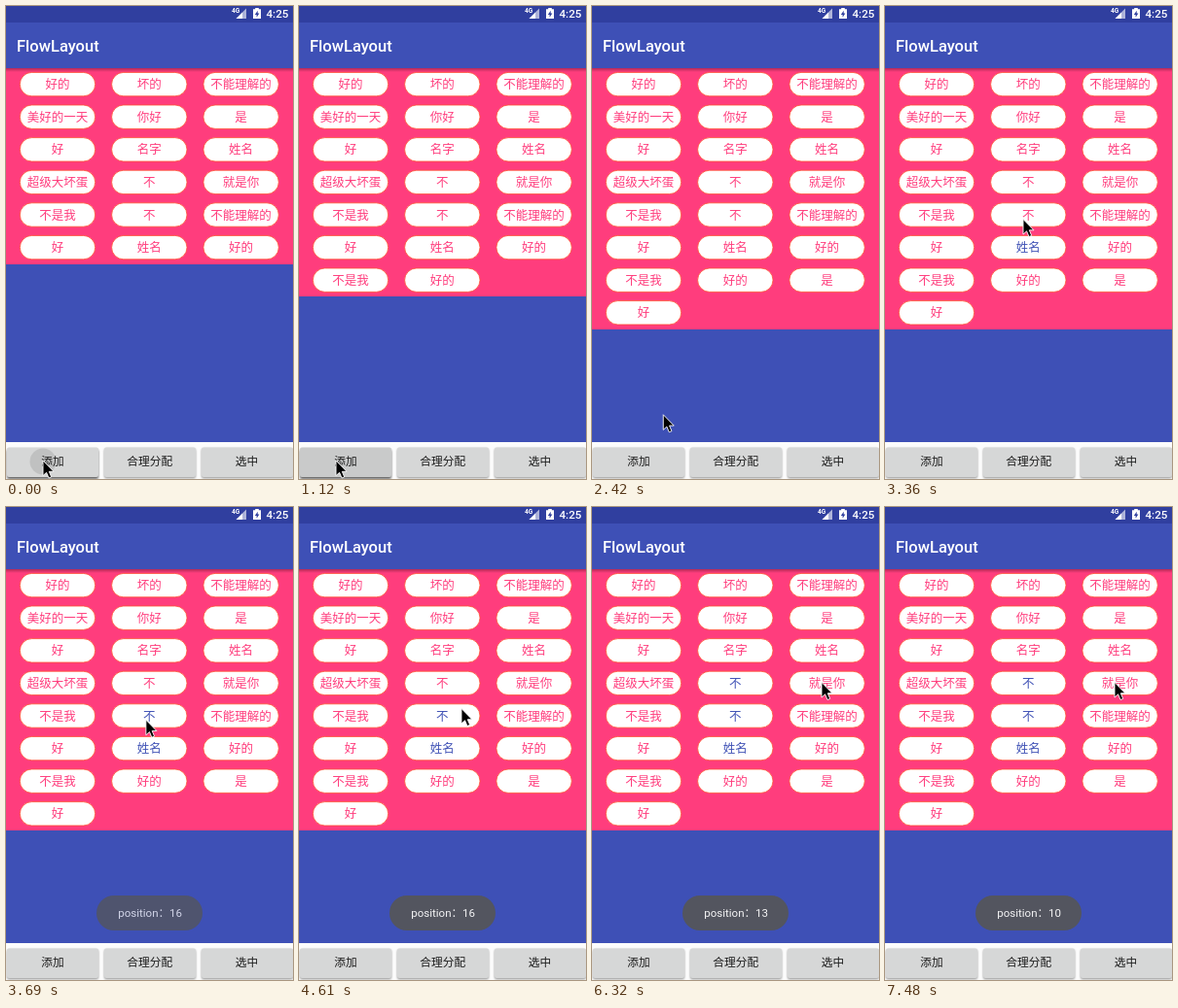
Recreate the animation shown at these times as an HTML page. Size 295 px wide and 487 px high, loop 8000 ms.

```html
<!DOCTYPE html>
<html lang="zh-CN">
<head>
<meta charset="utf-8">
<title>FlowLayout</title>
<style>
html, body { margin: 0; width: 100%; height: 100%; overflow: hidden; background: #3e50b6; }
svg { display: block; width: 295px; height: 487px; }
text { font-family: Roboto, 'Noto Sans CJK SC', 'Noto Sans CJK', sans-serif; }
.mid { text-anchor: middle; }
.tag { font-size: 12.5px; }
.label { font-size: 11.7px; font-weight: 500; fill: #1c1c1c; }
.toast { font-size: 11.5px; fill: #f4f4f5; }
</style>
</head>
<body>
<svg id="stage" viewBox="0 0 295 487" xmlns="http://www.w3.org/2000/svg">
  <defs>
    <linearGradient id="fade" x2="0" y2="1">
      <stop offset="0" stop-color="#000" stop-opacity=".3"/>
      <stop offset="1" stop-color="#000" stop-opacity="0"/>
    </linearGradient>
    <filter id="soft" x="-10%" y="-30%" width="120%" height="160%"><feGaussianBlur stdDeviation="1"/></filter>
    <clipPath id="key"><rect x="1" y="454.5" width="94" height="30.5" rx="2"/></clipPath>
  </defs>
  <rect width="295" height="487" fill="#3e50b6"/>
  <rect id="flow" y="64" width="295" fill="#ff3d7d"/>
  <rect y="64" width="295" height="4" fill="url(#fade)"/>
  <rect width="295" height="17" fill="#303f9f"/>
  <text x="11" y="47" font-size="16.5" font-weight="500" fill="#fff">FlowLayout</text>
  <g fill="#fff">
    <text x="232" y="6.5" font-size="6.5" font-weight="700">4G</text>
    <path d="M247 2.5V13H236.5Z" opacity=".35"/>
    <path d="M243 6.5V13H236.5Z"/>
    <path d="M247 2.5V13H243V6.5Z" opacity=".4"/>
    <path d="M254 3.2H256.2V2H259.8V3.2H262V13H254Z"/>
    <path d="M258.7 4.8L255.8 9H257.6V11.8L260.4 7.6H258.7Z" fill="#303f9f"/>
    <text x="267.5" y="12" font-size="11.6" font-weight="500">4:25</text>
  </g>
  <g id="tags"></g>
  <rect y="449" width="295" height="38" fill="#fcfcfc"/>
  <g id="keys"></g>
  <g id="toast">
    <rect x="93" y="400" width="109" height="36" rx="18" fill="#53555f"/>
    <text class="toast" x="174.5" y="422.3" text-anchor="end">position：1</text>
    <g id="digits"></g>
  </g>
  <path id="arrow" d="M0 0V15.6L3.6 12.3L6 18L8.7 16.9L6.3 11.3H11Z" fill="#000" stroke="#fff" stroke-width=".9"/>
</svg>
<script>
const LOOP = 8000;
const $ = id => document.getElementById(id);

function add(parent, name, attrs, text) {
  const el = document.createElementNS('http://www.w3.org/2000/svg', name);
  for (const k in attrs) el.setAttribute(k, attrs[k]);
  if (text) el.textContent = text;
  parent.appendChild(el);
  return el;
}

const words = ('好的 坏的 不能理解的 美好的一天 你好 是 好 名字 姓名 超级大坏蛋 不 就是你 ' +
  '不是我 不 不能理解的 好 姓名 好的 不是我 好的 是 好').split(' ');
const addedAt = { 18: 120, 19: 1120, 20: 1530, 21: 1950 };
const pickedAt = { 16: 3130, 13: 3640, 10: 5430 };

const tags = words.map((word, i) => {
  const x = 53 + (i % 3) * 94.3, y = 80.6 + Math.floor(i / 3) * 33.6;
  const group = add($('tags'), 'g', {});
  add(group, 'rect', { x: x - 38.7, y: y - 12.2, width: 77.4, height: 24.4, rx: 12.2,
    fill: '#fff', stroke: '#ff5030', 'stroke-width': .8 });
  const label = add(group, 'text', { class: 'tag mid', x, y: y + 4.6 }, word);
  return { group, label, shown: addedAt[i] || 0, picked: pickedAt[i] || Infinity };
});

let lift, ripple;
['添加', '合理分配', '选中'].forEach((word, i) => {
  const box = { x: 1 + i * 100, y: 454.5, width: 94, height: 30.5, rx: 2 };
  const shade = add($('keys'), 'rect', { ...box, y: 455.7, filter: 'url(#soft)', opacity: .4 });
  add($('keys'), 'rect', { ...box, fill: '#d6d7d7' });
  if (!i) {
    lift = shade;
    const clip = add($('keys'), 'g', { 'clip-path': 'url(#key)' });
    ripple = add(clip, 'circle', { cx: 38, cy: 469, fill: '#000' });
  }
  add($('keys'), 'text', { class: 'label mid', x: 48 + i * 99.7, y: 473.4 }, word);
});

const digits = ['6', '3', '0'].map(d => add($('digits'), 'text', { class: 'toast', x: 174.5, y: 422.3 }, d));

// time, x, y
const path = [
  [0, 38, 468], [2330, 38, 468], [2420, 73, 421.5], [2560, 108, 318], [2770, 131, 253],
  [3190, 131, 253], [3360, 142, 219.5], [3660, 142, 219.5], [3810, 151, 218],
  [3950, 151, 218], [4100, 167, 217], [4570, 167, 217], [4610, 167, 207.5],
  [4900, 157, 195], [5300, 142.5, 181], [5760, 142.5, 181], [5800, 146.5, 181],
  [6040, 190, 190], [6320, 236, 180.5], [LOOP, 236, 180.5]
];

const ramp = (t, a, b) => Math.min(1, Math.max(0, (t - a) / (b - a)));
const mix = (a, b, k) => a + (b - a) * k;

function cursorAt(t) {
  const i = path.findIndex((p, n) => n && t <= p[0]);
  const a = path[i - 1], b = path[i], k = ramp(t, a[0], b[0]);
  return [mix(a[1], b[1], k), mix(a[2], b[2], k)];
}

function draw(t) {
  for (const { group, label, shown, picked } of tags) {
    group.setAttribute('visibility', t >= shown ? 'visible' : 'hidden');
    label.setAttribute('fill', t >= picked ? '#3f51b5' : '#ff3d7d');
  }
  const rows = Math.ceil(tags.filter(tag => t >= tag.shown).length / 3);
  $('flow').setAttribute('height', Math.round(rows * 33.6));

  const spread = ramp(t, 120, 480), up = 1 - ramp(t, 1950, 2180);
  ripple.setAttribute('r', mix(13.5, 64, spread));
  ripple.setAttribute('opacity', mix(.1, .06, spread) * up);
  lift.setAttribute('opacity', .4 + .2 * up);
  lift.setAttribute('y', 455.7 + .8 * up);

  $('toast').setAttribute('opacity', ramp(t, 3380, 3760));
  const second = ramp(t, 5180, 5480), third = ramp(t, 7100, 7480);
  [1 - second, second * (1 - third), third].forEach((o, i) => digits[i].setAttribute('opacity', o));

  $('arrow').setAttribute('transform', `translate(${cursorAt(t)})`);
}

const start = performance.now();
function tick() {
  draw((performance.now() - start) % LOOP);
  requestAnimationFrame(tick);
}
tick();
</script>
</body>
</html>
```
